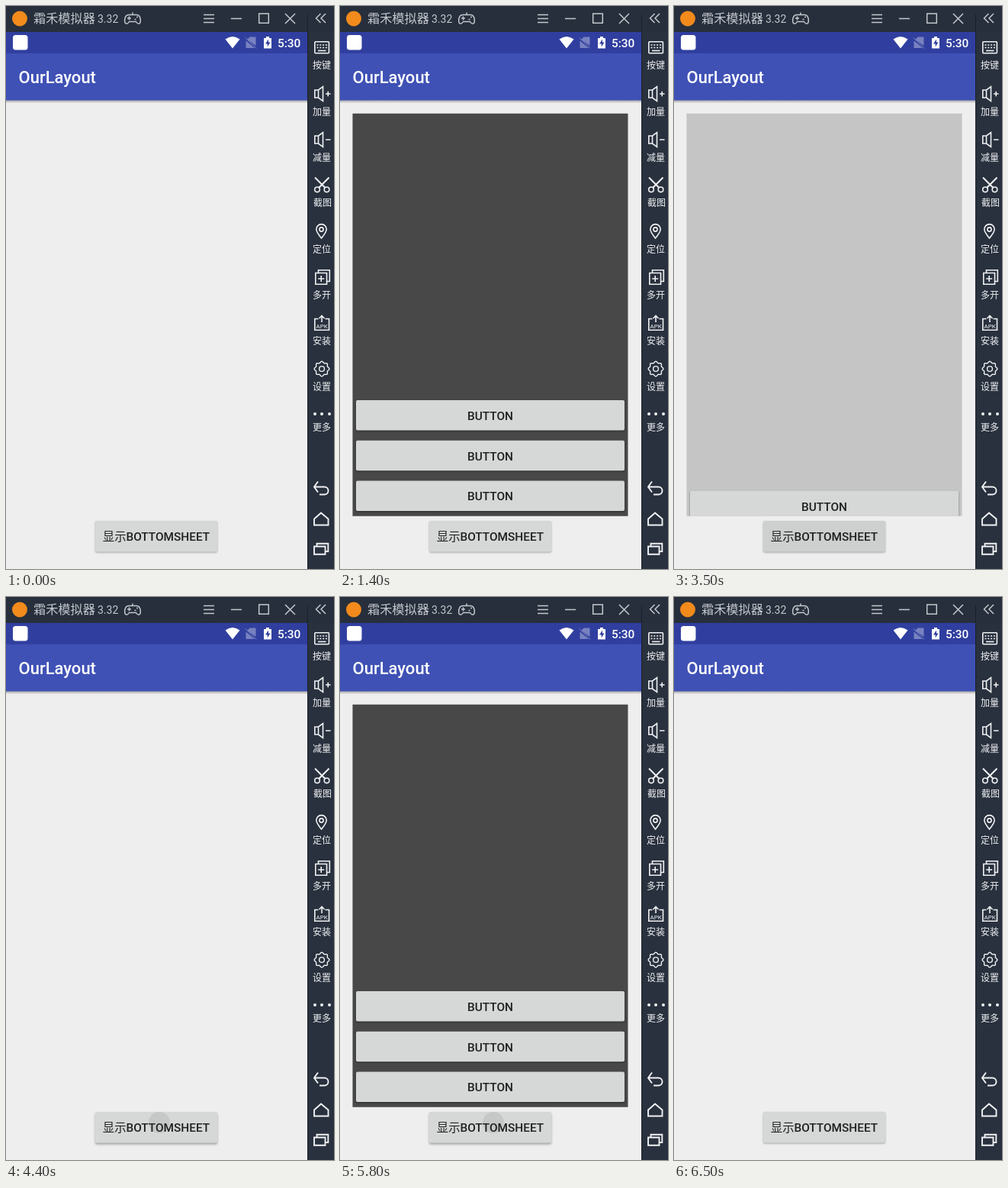
An HTML page that plays this animation: 430x737 px, repeating every 7100 ms.

```html
<!DOCTYPE html>
<html lang="zh">
<head>
<meta charset="utf-8">
<title>Bottom sheet</title>
<style>
html, body { margin: 0; width: 100%; height: 100%; overflow: hidden; background: #eee; }
svg { display: block; }
text { font-family: Roboto, "Noto Sans CJK SC", "Noto Sans CJK", sans-serif; }
.mid { text-anchor: middle; }
.caps { font-size: 15.4px; font-weight: 500; fill: #1f2020; text-anchor: middle; }
.line { fill: none; stroke: #f0f1f3; stroke-width: 1.6; }
.chrome { fill: none; stroke: #c3c7cd; stroke-width: 1.5; }
.labels { font-size: 12px; fill: #f0f1f3; text-anchor: middle; }
.labels text, .title { font-family: "Noto Sans CJK SC", "Noto Sans CJK", sans-serif; }
.key { fill: #d6d7d7; filter: drop-shadow(0 1px 1px rgba(0,0,0,.4)); }

/* --p: sheet openness, --lift: button elevation, --r / --ink: touch ripple */
#stage { animation: run 7100ms step-end infinite; }
#dim { opacity: var(--p); }
#list { transform: translateY(calc((1 - var(--p)) * 158px)); }
#show { filter: drop-shadow(0 calc(1px + var(--lift) * 1.3px) calc(1px + var(--lift) * .8px) rgba(0,0,0,.32)); }
#ripple { r: calc(var(--r) * 1px); opacity: var(--ink); }
@keyframes run {
  0%       { --p: 0;    --lift: 0;  --r: 0;   --ink: 0; }
  16.9014% { --p: 0;    --lift: 1;  --r: 14;  --ink: .075; }
  18.3098% { --p: .5;   --lift: .3; --r: 180; --ink: .06; }
  19.7183% { --p: 1;    --lift: 0;  --r: 0;   --ink: 0; }
  46.4788% { --p: 1;    --lift: 1;  --r: 0;   --ink: 0; }
  47.8873% { --p: .75;  --lift: .7; --r: 60;  --ink: .07; }
  49.2957% { --p: .25;  --lift: .2; --r: 180; --ink: .04; }
  50.7042% { --p: 0;    --lift: 0;  --r: 0;   --ink: 0; }
  61.9718% { --p: 0;    --lift: 1;  --r: 14;  --ink: .075; }
  63.3802% { --p: .5;   --lift: .3; --r: 180; --ink: .06; }
  64.7887% { --p: 1;    --lift: 0;  --r: 0;   --ink: 0; }
  81.6901% { --p: 1;    --lift: 1;  --r: 14;  --ink: .075; }
  83.0985% { --p: .446; --lift: .3; --r: 180; --ink: .06; }
  84.507%, 100% { --p: 0; --lift: 0; --r: 0;  --ink: 0; }
}

/* brief pointer hover on the location tool */
.hot-line { animation: hot-line 7100ms step-end infinite; }
.hot-text { animation: hot-text 7100ms step-end infinite; }
@keyframes hot-line { 0%, 91.5492%, 100% { stroke: #f0f1f3; } 90.1408% { stroke: #f5b91e; } }
@keyframes hot-text { 0%, 91.5492%, 100% { fill: #f0f1f3; } 90.1408% { fill: #f5b91e; } }
</style>
</head>
<body>
<svg id="stage" width="430" height="737" viewBox="0 0 430 737">
  <defs>
    <clipPath id="panel"><rect x="16.5" y="140.7" width="361" height="527"/></clipPath>
    <clipPath id="face"><rect x="117" y="674" width="160" height="40.5" rx="2"/></clipPath>
    <linearGradient id="shade" x2="0" y2="1">
      <stop stop-opacity=".32"/><stop offset="1" stop-opacity="0"/>
    </linearGradient>
  </defs>

  <!-- app -->
  <rect width="430" height="737" fill="#eee"/>
  <rect y="123" width="396" height="4.5" fill="url(#shade)"/>
  <rect y="62" width="396" height="61.5" fill="#3f51b5"/>
  <rect y="34" width="396" height="28" fill="#303f9f"/>
  <text x="16.5" y="101" font-size="22" font-weight="500" fill="#fff">OurLayout</text>

  <!-- status icons -->
  <g fill="#fff">
    <rect x="9" y="38" width="19.5" height="19.5" rx="3.5"/>
    <path d="M287.5 43.5Q297 36.500 306.500 43.500L297 55.500Z"/>
    <path d="M319.500 40.500H327.500V52L316.500 44ZM314.500 45.500L326 55H314.500Z" opacity=".35"/>
    <path d="M314 41.500L328 55.500" stroke="#fff" opacity=".4"/>
    <path d="M338 42H341V40H345V42H348V55.500H338Z"/>
    <path d="M344 43.500L340 49.500H342.700V53.500L346.500 47.500H344Z" fill="#303f9f"/>
    <text x="356" y="54" font-size="15.4" font-weight="500">5:30</text>
  </g>

  <!-- sheet -->
  <g clip-path="url(#panel)">
    <rect id="dim" x="16" y="140" width="362" height="528" fill="#484848"/>
    <g id="list">
      <rect class="key" x="21" y="516" width="352" height="39.5" rx="2"/>
      <rect class="key" x="21" y="568.7" width="352" height="39.5" rx="2"/>
      <rect class="key" x="21" y="621.4" width="352" height="39.5" rx="2"/>
      <text class="caps" x="197" y="542">BUTTON</text>
      <text class="caps" x="197" y="594.7">BUTTON</text>
      <text class="caps" x="197" y="647.4">BUTTON</text>
    </g>
  </g>

  <rect id="show" x="117" y="674" width="160" height="40.5" rx="2" fill="#d6d7d7"/>
  <g clip-path="url(#face)"><circle id="ripple" cx="201" cy="688"/></g>
  <text class="caps" x="197" y="700"><tspan font-weight="400">显示</tspan>BOTTOMSHEET</text>

  <!-- window bar -->
  <rect width="430" height="34" fill="#272f3c"/>
  <rect x="395" y="34" width="35" height="703" fill="#29313e"/>
  <rect x="395" y="11" width="1" height="726" fill="#1a202a"/>
  <circle cx="18" cy="16.500" r="10" fill="#f28a1c"/>
  <g fill="#c3c7cd">
    <text class="title" x="36" y="22.300" font-size="16.2">霜禾模拟器</text>
    <text x="120" y="22" font-size="14">3.32</text>
  </g>
  <g class="chrome">
    <path d="M161 11.500H171C175 11.500 177 16 176.300 20.500C175.800 24 172.500 24 170.500 20.500H161.500C159.500 24 156.200 24 155.700 20.500C155 16 157 11.500 161 11.500ZM166 11.500V8.500M159 16H164M161.500 13.500V18.500M168.500 17.500H170.500M171 14.500H173"/>
    <path d="M259 11.500H273M259 16.500H273M259 21.500H273M295 16.500H309"/>
    <rect x="331.7" y="10" width="12.6" height="12.300"/>
    <path d="M366 10L379 23M379 10L366 23M412.500 10L406.500 16L412.500 22M419 10L413 16L419 22"/>
  </g>

  <!-- tool icons -->
  <g class="line">
    <rect x="404.8" y="46.800" width="18.600" height="15" rx="1"/>
    <path d="M407.500 51H421M407.500 54.500H421" stroke-dasharray="2 1.800"/>
    <path d="M409 58.500H419.500"/>
    <path d="M415.500 105.500V124.500L409.500 120H404.800V110H409.500ZM409.500 110V120M419 115H425.500M422.200 111.800V118.200"/>
    <path d="M415.500 165.500V184.500L409.500 180H404.800V170H409.500ZM409.500 170V180M419 175H425.500"/>
    <path d="M405 224.500L418 237.500M423.500 224.500L410.500 237.500" stroke-width="2"/>
    <circle cx="408" cy="240.300" r="3.300"/><circle cx="420.500" cy="240.300" r="3.300"/>
    <g class="hot-line">
      <path d="M413.500 304C409 298.500 406.800 295.500 406.800 292.300A6.700 6.700 0 0 1 420.200 292.300C420.200 295.500 418 298.500 413.500 304Z"/>
      <circle cx="413.500" cy="292.500" r="2.600"/>
    </g>
    <path d="M409.500 349.500V345.800H424.300V360.500H420.500M405.800 349.500H420.500V364.300H405.800ZM413.200 353V361M409.200 357H417.200"/>
    <path d="M409.500 409.500H404.800V424.300H423.500V409.500H418.500M414 414V406M410.500 409L414 405.500L417.500 409"/>
    <path id="gear" stroke-width="1.400"/>
    <circle cx="414" cy="475" r="3.400" stroke-width="1.400"/>
    <path d="M409 622.500L404 629.500L409 636.500M404 629.500H417.500A5 5 0 0 1 417.500 639.500H411" stroke-width="1.900"/>
    <path d="M413 663.500L422.500 671.500V679.500H404V671.500Z" stroke-width="1.900"/>
    <path d="M404 707.500H418.500V717.800H404ZM407.500 707.500V703.800H422.300V714H418.500" stroke-width="1.900"/>
  </g>
  <g fill="#f0f1f3">
    <circle cx="405" cy="534" r="2"/><circle cx="414" cy="534" r="2"/><circle cx="424" cy="534" r="2"/>
    <text class="mid" x="414.200" y="421.500" font-size="8">APK</text>
  </g>
  <g class="labels">
    <text x="414" y="82">按键</text>
    <text x="414" y="143">加量</text>
    <text x="414" y="203">减量</text>
    <text x="415" y="262">截图</text>
    <text class="hot-text" x="414" y="323">定位</text>
    <text x="414" y="383">多开</text>
    <text x="414" y="443">安装</text>
    <text x="414" y="503">设置</text>
    <text x="414" y="556">更多</text>
  </g>
</svg>
<script>
// Eight-lobed gear outline
const points = Array.from({ length: 96 }, (_, i) => {
  const a = i / 96 * 2 * Math.PI;
  const r = 8.9 + 0.9 * Math.cos(8 * a);
  return `${(414 + r * Math.cos(a)).toFixed(2)} ${(475 + r * Math.sin(a)).toFixed(2)}`;
});
document.getElementById("gear").setAttribute("d", `M${points.join("L")}Z`);
</script>
</body>
</html>
```
